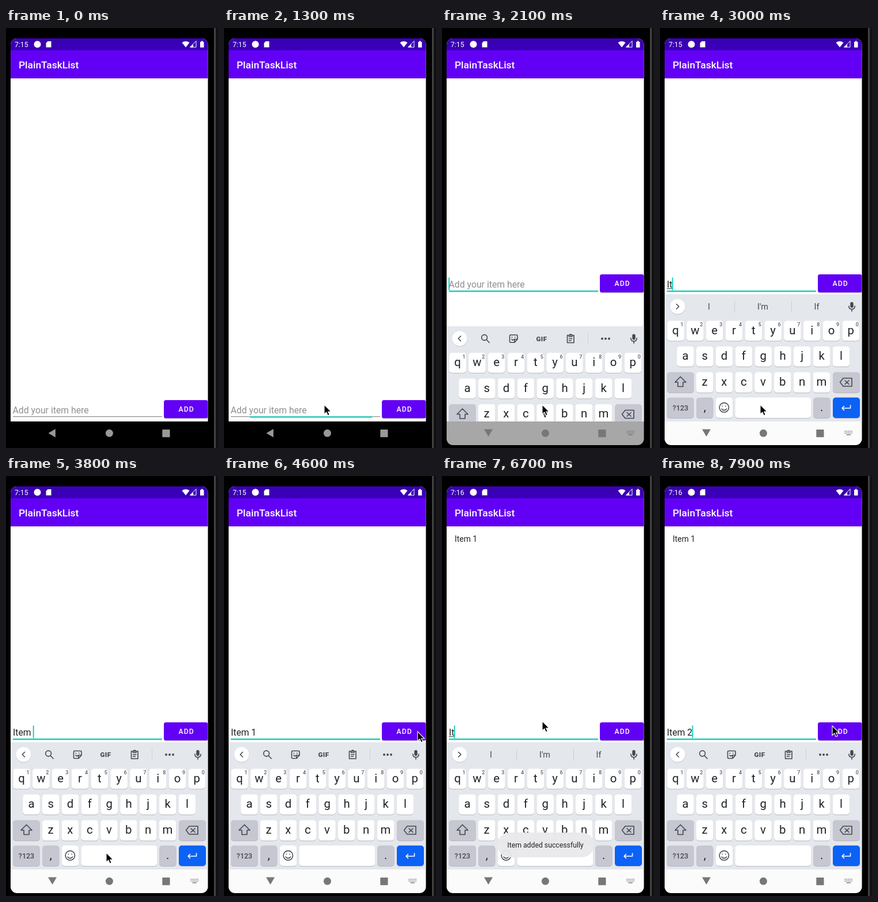
These frames come from a looping animation (368x728 px, 8000 ms). An HTML page:

```html
<!DOCTYPE html>
<html lang="en">
<head>
<meta charset="utf-8">
<title>Todo list demo</title>
<style>
  html, body { margin: 0; width: 100%; height: 100%; overflow: hidden; background: #000; }
  svg { display: block; width: 368px; height: 728px; }
  text { font-family: Roboto, "Noto Sans", sans-serif; white-space: pre; }
  .mid { text-anchor: middle; }
  .line { fill: none; stroke: #444950; stroke-width: 1.6; stroke-linejoin: round; stroke-linecap: round; }
  .ink { fill: #444950; }
</style>
</head>
<body>
<svg viewBox="0 0 368 728">
  <defs>
    <clipPath id="screen"><rect x="8" y="18" width="342.5" height="705" rx="11"/></clipPath>
    <clipPath id="ime"><rect x="8" y="440" width="342.5" height="242"/></clipPath>
  </defs>
  <rect width="368" height="728"/>
  <rect x="361" width="3.5" height="728" fill="#414141"/>
  <rect x="364.5" width="3.5" height="728" fill="#101010"/>

  <g clip-path="url(#screen)">
    <rect x="8" y="18" width="343" height="664" fill="#fff"/>
    <rect x="8" y="38" width="343" height="49.3" fill="#6200f5"/>
    <rect x="8" y="18" width="343" height="20.5" fill="#3a00b5"/>
    <g fill="#fff">
      <text id="clock" x="15" y="33" font-size="12.2"></text>
      <circle cx="54.5" cy="28.3" r="6"/>
      <path d="M72.5 23H78.5V33.5H69.5V26Z"/>
      <path d="M305.5 25.3Q312 20.5 318.5 25.3L312 33.5Z"/>
      <path d="M330 22.5V33.2H319.5Z" fill="none" stroke="#fff"/>
      <path d="M325 28V33.2H319.5Z"/>
      <path d="M337 24H338.8V22.5H341.6V24H343.5V33.7H337Z"/>
      <text x="22" y="70" font-size="17.4" font-weight="500">PlainTaskList</text>
    </g>
    <text id="item" x="22" y="113.6" font-size="13.9" fill="#222">Item 1</text>

    <g id="form">
      <rect x="12" y="673" width="259" height="1.2" fill="#8c8c8c"/>
      <rect id="accent" y="673.3" height="2.2" fill="#03dac5"/>
      <text id="hint" x="11.5" y="667.8" font-size="15.8" fill="#909090">Add your item here</text>
      <text id="typed" x="12" y="667.8" font-size="15.7" fill="#202020"></text>
      <rect id="compose" x="12" y="669.3" height="1" fill="#222"/>
      <rect id="caret" y="650.5" width="1.8" height="22" fill="#03cdbb"/>
      <rect x="274" y="646.5" width="77" height="31" rx="3.5" fill="#000" opacity=".25"/>
      <rect x="274" y="645" width="76.5" height="31.2" rx="3.5" fill="#6200f5"/>
      <text x="299.5" y="665.2" font-size="12.2" font-weight="500" letter-spacing="1.09" fill="#fff">ADD</text>
    </g>

    <g clip-path="url(#ime)">
      <g id="keyboard">
        <rect x="8" y="461.5" width="343" height="222" fill="#e4e7ec"/>
        <circle cx="30.5" cy="483.5" r="13.3" fill="#c6c9d0"/>
        <circle cx="30.5" cy="482.8" r="13" fill="#fff"/>
        <g id="tools">
          <path class="line" d="M32.5 478.5L28.3 482.8L32.5 487M77.6 485.2L82 489.8"/>
          <circle class="line" cx="73.6" cy="481" r="4.9"/>
          <path class="line" d="M119 476.5H129.5Q131 476.5 131 478V484L126 489.5H119Q117.5 489.5 117.5 488V478Q117.5 476.5 119 476.5ZM131 484H126V489.5M121 484Q123 486.8 125.5 484M121.5 480.4v.3M126.8 480.4v.3"/>
          <text class="mid ink" x="173" y="487" font-size="11.5" font-weight="900" letter-spacing=".5">GIF</text>
          <path class="line" d="M217.5 477H229V490H217.5ZM220.5 477V479.5H226V477M220.5 483H226M220.5 486.2H224.5M222 475.6H224.5"/>
          <path d="M253.5 473V493" stroke="#d0d3d9"/>
          <g class="ink"><circle cx="278" cy="483" r="1.9"/><circle cx="284" cy="483" r="1.9"/><circle cx="290" cy="483" r="1.9"/></g>
        </g>
        <g id="words" fill="#444950" font-size="14.4">
          <path class="line" d="M28.5 478.5L32.8 482.8L28.5 487"/>
          <path d="M129.5 473V493M228.5 473V493" stroke="#c9ccd2"/>
          <text class="mid" x="85" y="488"></text>
          <text class="mid" x="178.5" y="488"></text>
          <text class="mid" x="272" y="488"></text>
        </g>
        <rect class="ink" x="330.3" y="475" width="5.4" height="10" rx="2.7"/>
        <path class="line" d="M327.8 482Q328 487.5 333 487.5T338.2 482M333 488V491"/>
        <g id="keys"></g>
        <path class="line" d="M35.5 604.5L45 614H40V621.5H31V614H26Z"/>
        <path class="line" d="M318 607H333V621H318L312.5 614ZM321 611L328 617.5M328 611L321 617.5"/>
        <circle class="line" cx="111.3" cy="657.8" r="8.2"/>
        <path class="line" d="M107 660.2Q111.3 665 115.6 660.2M108.5 655.2v.4M114 655.2v.4"/>
        <path class="line" style="stroke:#fff" d="M330.5 654V659H316M319.5 655.5L316 659L319.5 662.5"/>
      </g>
    </g>

    <rect id="navBar" x="8" y="682" width="343" height="42"/>
    <g id="navIcons">
      <path id="back"/>
      <circle cx="179.4" cy="702.3" r="6.5"/>
      <rect x="271.3" y="696" width="13.2" height="13.2" rx=".8"/>
      <g id="imeIcon">
        <path d="M320.5 699H334M320.5 702H334" stroke-width="1.7" stroke-dasharray="1.7 1.2"/>
        <path d="M323.5 705H331" stroke-width="1.5"/>
      </g>
    </g>

    <g id="toast">
      <rect x="96" y="618" width="168" height="43" rx="21.5" fill="#e9e9eb" opacity=".94"/>
      <text class="mid" x="179.5" y="644" font-size="12.25" fill="#222">Item added successfully</text>
    </g>
  </g>
  <path id="mouse" d="M0 0V16.5L3.8 13L6.3 18.8L9.2 17.6L6.7 12H12Z" stroke="#fff" stroke-width="1.1"/>
</svg>
<script>
const LOOP = 8000, STEP = 100;
const $ = id => document.getElementById(id);
const set = (el, attrs) => { for (const k in attrs) el.setAttribute(k, attrs[k]); };
const show = (el, on) => { el.style.display = on ? '' : 'none'; };

function add(parent, tag, attrs, content = '') {
  const el = document.createElementNS('http://www.w3.org/2000/svg', tag);
  set(el, attrs);
  el.textContent = content;
  return parent.appendChild(el);
}

// Keyboard layout
function key(x, y, w, label = '', fill = '#fff', size = 20.3) {
  const h = y > 590 ? 35.5 : 34.8;
  add($('keys'), 'rect', { x, y: y + 1, width: w, height: h, rx: 5, fill: '#b5b8c0' });
  add($('keys'), 'rect', { x, y, width: w, height: h, rx: 5, fill });
  if (label) add($('keys'), 'text', {
    class: 'mid', x: x + w / 2, y: y + (size < 15 ? 22.5 : 23.3), 'font-size': size,
    'font-weight': size < 15 ? 500 : 400, fill: size < 15 ? '#444950' : '#202124'
  }, label);
}
const GRAY = '#c6c7d1', PITCH = 33.8;
[['qwertyuiop', 27.1, 507.5], ['asdfghjkl', 44, 552], ['zxcvbnm', 77.6, 596.5]].forEach(([letters, x0, y], row) =>
  [...letters].forEach((c, i) => {
    const x = x0 + i * PITCH;
    key(x - 14.8, y, 29.6, c);
    if (!row) add($('keys'), 'text', { class: 'mid', x: x + 11, y: 517, 'font-size': 9, 'font-weight': 500, fill: '#555a62' }, (i + 1) % 10);
  }));
key(12, 596.5, 47, '', GRAY);
key(300, 596.5, 47, '', GRAY);
key(12, 640.5, 47, '?123', GRAY, 12.5);
key(63, 640.5, 29.4, ',', GRAY);
key(96.8, 640.5, 29.4);
key(130.3, 640.5, 132);
key(266, 640.5, 29.6, '.', GRAY);
key(300, 640.5, 47, '', '#0b62f5');

// Timeline
const typing = [
  [0, ''], [2600, 'I'], [3000, 'It'], [3200, 'Ite'], [3400, 'Item'], [3700, 'Item '], [4000, 'Item 1'],
  [5100, ''], [6300, 'I'], [6700, 'It'], [6900, 'Ite'], [7000, 'Item'], [7300, 'Item '], [7500, 'Item 2']
];
const guesses = {
  I: ['I', "I'm", 'If'], It: ['It', "It's", 'Its'],
  Ite: ['Ite', 'Item', 'Items'], Item: ['Item', 'Items', 'Itemize']
};
const mousePath = [
  [100, 336, 690], [500, 174, 653], [4100, 174, 653], [4300, 262, 500], [4400, 337, 356], [4600, 336, 443],
  [5000, 288, 451], [5600, 288, 451], [6000, 174, 425], [7500, 174, 425], [7700, 236, 411], [7900, 299, 433]
];
const FOCUS = 1500, RESIZE = 1800, ADDED = 5100;

const ramp = (t, a, b) => Math.min(1, Math.max(0, (t - a) / (b - a)));
const latest = t => typing.filter(s => s[0] <= t).pop() || typing[0];

function mouseAt(t) {
  const i = mousePath.findIndex(p => p[0] > t);
  if (i < 0) return mousePath[mousePath.length - 1].slice(1);
  const [a, b] = [mousePath[Math.max(0, i - 1)], mousePath[i]];
  const k = ramp(t, a[0], b[0]);
  return [1, 2].map(n => a[n] + (b[n] - a[n]) * k);
}

function render(t) {
  const [since, text] = latest(t);
  const composing = text in guesses;

  $('clock').textContent = t < ADDED ? '7:15' : '7:16';
  show($('item'), t >= ADDED);

  set($('form'), { transform: `translate(0 ${t < RESIZE ? 0 : -218})` });
  const [left, right] = t < 1300 ? [0, 0] : t < FOCUS ? [45, 257] : [12, 271];
  set($('accent'), { x: left, width: right - left });
  show($('hint'), !text);
  $('typed').textContent = text;
  const width = text ? $('typed').getComputedTextLength() : 0;
  set($('compose'), { width: composing ? width : 0 });
  set($('caret'), { x: 11.4 + width });
  const blinkStart = Math.max(since, RESIZE);
  show($('caret'), t >= FOCUS && (t < RESIZE || (t - blinkStart) % 1000 < 500));

  // The suggestion strip follows the text by one step.
  const words = guesses[latest(t - STEP)[1]];
  show($('tools'), !words);
  show($('words'), words);
  if (words) $('words').querySelectorAll('text').forEach((el, i) => { el.textContent = words[i]; });

  const rise = 1 - (1 - ramp(t, 1900, 2300)) ** 2;
  set($('keyboard'), { transform: `translate(0 ${(1 - rise) * 222})` });
  const shade = Math.round(251 * ramp(t, 1900, 2200));
  set($('navBar'), { fill: `rgb(${shade},${shade},${shade})` });
  const tint = t < RESIZE ? '#999' : t < 2000 ? '#606060' : '#777';
  set($('navIcons'), { fill: tint, stroke: 'none' });
  set($('imeIcon'), { stroke: tint });
  show($('imeIcon'), t >= RESIZE);
  set($('back'), { d: t < 2000 ? 'M73.5 702.3L85.8 695V709.6Z' : 'M73 695.5H88L80.5 708.3Z' });

  set($('toast'), { opacity: ramp(t, 5400, 5620) * (1 - ramp(t, 7400, 7650)) });
  show($('mouse'), t >= 100);
  set($('mouse'), { transform: `translate(${mouseAt(t)})` });
}

const start = performance.now();
function tick() {
  const t = (performance.now() - start) % LOOP;
  render(Math.floor(t / STEP) * STEP);
  requestAnimationFrame(tick);
}
tick();
</script>
</body>
</html>
```
